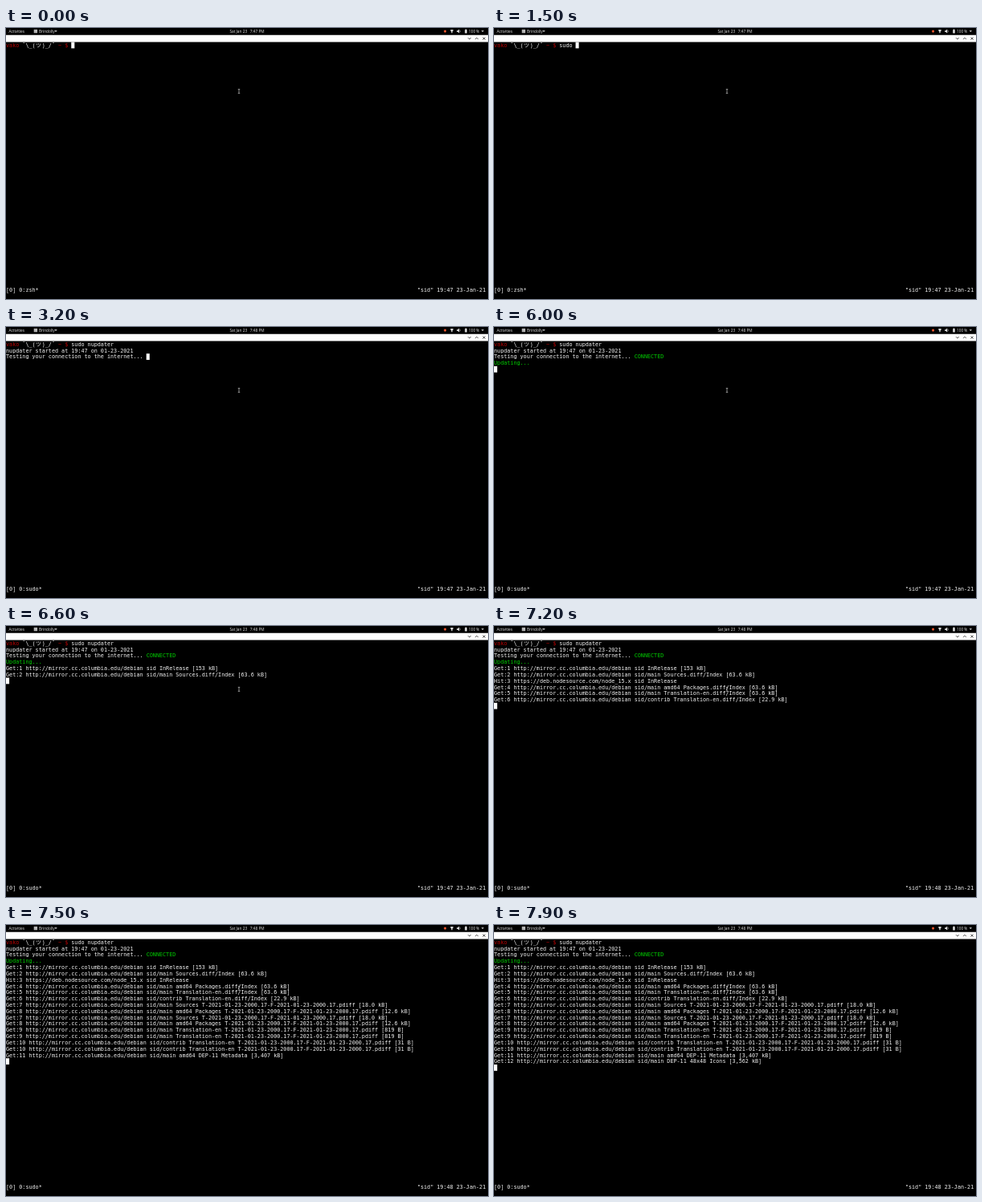
An HTML page that plays this animation: 600x338 px, repeating every 8000 ms.

```html
<!DOCTYPE html>
<html lang="en">
<head>
<meta charset="utf-8">
<title>Terminal update</title>
<style>
html, body { margin: 0; width: 100%; height: 100%; overflow: hidden; background: #000; }
#stage { position: absolute; left: 0; top: 0; width: 1920px; height: 1080px; transform-origin: 0 0; transform: scale(.3125, .31296); }
svg { position: absolute; left: 0; top: 0; }
svg text { font: 15.3px 'Open Sans', 'Noto Sans', sans-serif; fill: #e4e4e4; white-space: pre; }
pre { position: absolute; margin: 0; font: 21.6px/25px 'DejaVu Sans Mono', 'Noto Sans CJK JP', monospace; color: #f2f2f2; font-variant-ligatures: none; }
#screen { left: 0; top: 56px; }
#job { left: 0; top: 1031px; }
#info { left: 1638px; top: 1031px; }
.red { color: #b40000; }
.green { color: #00cd00; }
.wide { display: inline-block; width: 26px; text-align: center; }
.cursor { display: inline-block; width: 13px; height: 25px; background: #fff; vertical-align: top; }
</style>
</head>
<body>
<div id="stage">
  <pre id="screen"></pre>
  <pre id="job"></pre>
  <pre id="info"></pre>
  <svg width="1920" height="1080">
    <path d="M0 28H1920V56H0z" fill="#fff"/>
    <text x="11" y="19">Activities</text>
    <path d="M111 6h14v14h-14z" fill="#b4b4b4"/>
    <text x="131" y="19">Brindolly</text>
    <text id="clock" x="960" y="19" text-anchor="middle"></text>
    <text x="1843" y="19">100 %</text>
    <circle cx="1749" cy="13" r="5" fill="#e8552d"/>
    <g fill="#e4e4e4">
      <path d="M193 10h11l-5.5 6z"/>
      <path d="M1893 10h11l-5.5 6z"/>
      <path d="M1769 9q7-5 14 0l-5 5v6h-4v-6z"/>
      <path d="M1796 10h4l5-5v16l-5-5h-4z"/>
      <path d="M1828 7h2v-2h4v2h2v14h-8z"/>
    </g>
    <g fill="none" stroke-width="2">
      <path d="M1807 8q4 5 0 10" stroke="#e4e4e4"/>
      <path d="M1840 39l6 6 6-6M1869 45l6-6 6 6M1899 37l10 10m0-10l-10 10" stroke="#222" stroke-width="2.5"/>
      <path d="M924 244h8m-4 0v16m-4 0h8" stroke="#ddd"/>
    </g>
  </svg>
</div>
<script>
const LOOP = 8000;
const $ = id => document.getElementById(id);
const paint = (name, text) => `<span class="${name}">${text}</span>`;
const get = (n, rest) => `Get:${n} http://mirror.cc.columbia.edu/debian sid/${rest}\n`;
const stamp = '2021-01-23-2000.17';
const diff = (n, part, size) => get(n, `${part} T-${stamp}-F-${stamp}.pdiff [${size}]`);
const pair = diff(7, 'main Sources', '18.0 kB') + diff(8, 'main amd64 Packages', '12.6 kB');
const main9 = diff(9, 'main Translation-en', '819 B');
const contrib10 = diff(10, 'contrib Translation-en', '31 B');

// [time in ms, output appended at that time]
const output = [
  [0, paint('red', 'vako') + ' ¯\\_(' + paint('wide', 'ツ') + ')_/¯ ' + paint('red', '~ $') + ' '],
  [900, 's'], [1000, 'u'], [1100, 'd'], [1300, 'o'], [1500, ' '],
  [1700, 'n'], [1900, 'u'], [2000, 'p'], [2200, 'dater '],
  [2900, '\nnupdater started at 19:47 on 01-23-2021\nTesting your connection to the internet... '],
  [6000, paint('green', 'CONNECTED\nUpdating...') + '\n'],
  [6300, get(1, 'InRelease [153 kB]').replace('sid/', 'sid ')],
  [6600, get(2, 'main Sources.diff/Index [63.6 kB]')],
  [6900, 'Hit:3 https://deb.nodesource.com/node_15.x sid InRelease\n' +
    get(4, 'main amd64 Packages.diff/Index [63.6 kB]')],
  [7200, get(5, 'main Translation-en.diff/Index [63.6 kB]') +
    get(6, 'contrib Translation-en.diff/Index [22.9 kB]')],
  [7300, pair],
  [7400, pair],
  [7500, main9 + main9 + contrib10 + contrib10 + get(11, 'main amd64 DEP-11 Metadata [3,407 kB]')],
  [7900, get(12, 'main DEP-11 48x48 Icons [3,562 kB]')]
];

let shown = '';
function draw(now) {
  const t = now % LOOP;
  const text = output.filter(([at]) => t >= at).map(([, part]) => part).join('');
  if (text !== shown) {
    $('screen').innerHTML = text + paint('cursor', '');
    shown = text;
  }
  $('job').textContent = `[0] 0:${t < 2900 ? 'zsh' : 'sudo'}*`;
  $('info').textContent = `"sid" 19:${t < 7200 ? 47 : 48} 23-Jan-21`;
  $('clock').textContent = `Sat Jan 23\u2002 7:${t < 3200 ? 47 : 48} PM`;
}

const start = performance.now();
function tick() {
  draw(performance.now() - start);
  requestAnimationFrame(tick);
}
tick();
</script>
</body>
</html>
```
